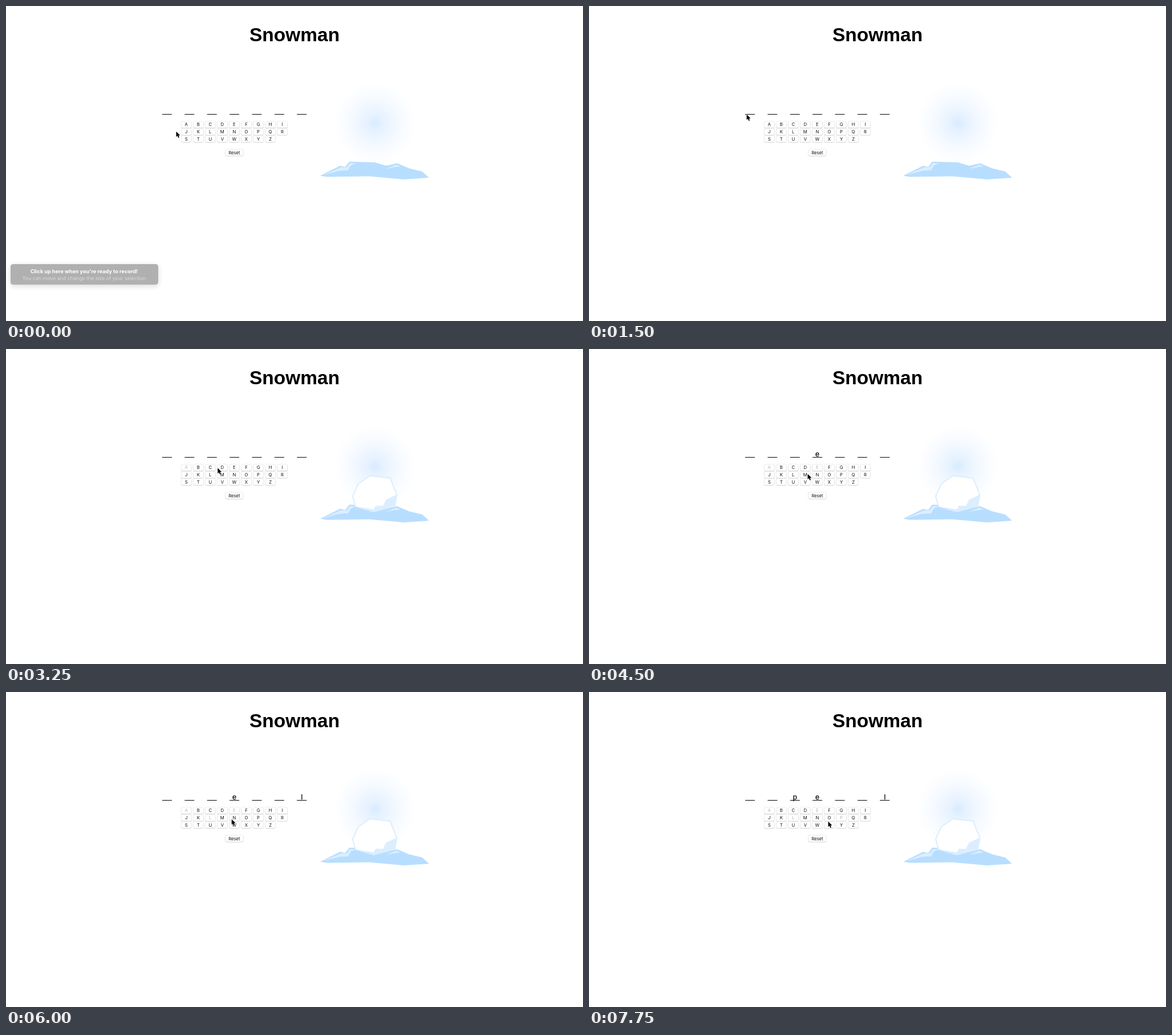
Recreate the animation shown at these times as an HTML page. Size 1012 px wide and 554 px high, loop 8 s.

```html
<!DOCTYPE html>
<html lang="en">
<head>
<meta charset="utf-8">
<title>Snowman</title>
<style>
  html, body { margin: 0; width: 100%; height: 100%; overflow: hidden; background: #fff; }
  svg { display: block; width: 100vw; height: 100vh; }
  text { text-anchor: middle; }
  .title { font: bold 33.5px "Liberation Sans", Arial, sans-serif; }
  .guess { font: 12.5px "Liberation Sans", Arial, sans-serif; stroke: #000; stroke-width: .25; }
  .key { font: 7.7px Inter, sans-serif; fill: #111; }
  .off { fill: #b4b4b4; }
  .tip { font: 8.8px Inter, sans-serif; fill: #d9d9d9; }
  .tip.main { font-weight: 700; font-size: 9.1px; fill: #fff; }
</style>
</head>
<body>
<svg viewBox="0 0 1012 554">
  <defs>
    <radialGradient id="glow">
      <stop offset="0" stop-color="#d8ebff"/>
      <stop offset=".2" stop-color="#e6f2ff"/>
      <stop offset=".6" stop-color="#f6faff"/>
      <stop offset="1" stop-color="#fff"/>
    </radialGradient>
    <filter id="soft" x="-10%" y="-50%" width="120%" height="200%">
      <feGaussianBlur stdDeviation="5"/>
    </filter>
  </defs>

  <text class="title" x="506" y="62">Snowman</text>

  <circle cx="647" cy="206" r="72" fill="url(#glow)"/>
  <path fill="#b8deff" d="M551 298.5L586 281L595 283L602 273.8L647 275L667 281L686 276.5L707 285.5L730 291L742 302L698 305L637 299.5L563 300.5Z"/>
  <path fill="#dbeeff" d="M556 297.5L588 283.6L598 283.5L603 276L614 276.5L605 280.5L600 289L585 289.8Z
    M666 286.3L685 279L692 282.3L683 283.2Z"/>
  <g id="ball" fill="#dbeeff">
    <path fill="#fff" stroke="#dbeeff" stroke-width="2" d="M608 259L618 236.8L638.3 223L673.6 227L685.4 256L682 276L645 286L613 277Z"/>
    <path d="M685.4 256L666.5 265L661 276L648.5 275.5L645 282L613 277L645 287L683 277Z"/>
  </g>

  <g id="slots"></g>
  <g id="keys"></g>

  <g id="tip">
    <rect x="8" y="456" width="259" height="37" rx="5" opacity=".14" filter="url(#soft)"/>
    <rect x="8" y="454" width="259" height="36" rx="4.5" fill="#b0b0b0"/>
    <text class="tip main" x="137" y="469.5">Click up here when you're ready to record!</text>
    <text class="tip" x="137" y="481.5">You can move and change the size of your selection</text>
  </g>

  <path id="cursor" stroke="#fff" stroke-linejoin="round" paint-order="stroke"
    d="M0 0V9.6L2.2 7.6L3.8 11.2L5.5 10.4L4 7L6.9 6.8Z"/>
</svg>

<script>
const LOOP = 8000, STEP = 250;
const $ = id => document.getElementById(id);

// Secret word: letters not guessed yet stay blank
const word = '  pe  l';
const guesses = 'AELP';
const guessTime = i => 2500 + 1500 * i;

// Places where the pointer rests or turns
const stops = [
  { t: 0, x: 298, y: 220 },
  { t: 250, x: 227, y: 228 },
  { t: 750, x: 205, y: 229 },
  { t: 1250, x: 205, y: 229 },
  { t: 1500, x: 276, y: 190 },
  { t: 2500, x: 317, y: 208 },
  { t: 3750, x: 400, y: 209 },
  { t: 4500, x: 383, y: 219 },
  { t: 5500, x: 359, y: 223 },
  { t: 6550, x: 437, y: 223 },
  { t: 7500, x: 437, y: 225 },
  { t: 7750, x: 419, y: 227 }
];

function add(parent, tag, attrs, text) {
  const el = document.createElementNS('http://www.w3.org/2000/svg', tag);
  for (const k in attrs) el.setAttribute(k, attrs[k]);
  if (text) el.textContent = text;
  return parent.appendChild(el);
}

function addKey(label, cx, cy, w) {
  const box = { x: cx - w / 2, y: cy - 5.9, width: w, height: 11.6, rx: 2.6 };
  add($('keys'), 'rect', { ...box, y: box.y + .7, fill: '#c4c4c4' });
  add($('keys'), 'rect', { ...box, fill: '#fff', stroke: '#dedede', 'stroke-width': .6 });
  return add($('keys'), 'text', { class: 'key', x: cx, y: cy + 2.8 }, label);
}

const marks = [...word].map((ch, i) => {
  const x = 282.4 + 39.4 * i;
  add($('slots'), 'rect', { x: x - 8.5, y: 190, width: 17, height: 1 });
  const el = add($('slots'), 'text', { class: 'guess', x, y: 189 }, ch);
  return { ch, el };
});

const keys = {};
for (let i = 0; i < 26; i++) {
  const ch = String.fromCharCode(65 + i);
  keys[ch] = addKey(ch, 316.2 + 21.05 * (i % 9), 208.6 + 12.6 * Math.floor(i / 9), 18.2);
}
addKey('Reset', 400.4, 257.8, 32);

const show = (el, on) => el.setAttribute('visibility', on ? 'visible' : 'hidden');
const ease = u => u * u * (3 - 2 * u);

function pointer(t) {
  const i = stops.findIndex(s => s.t >= t);
  if (i < 1) return stops[0];
  const a = stops[i - 1], b = stops[i];
  const u = ease((t - a.t) / (b.t - a.t));
  return { x: a.x + (b.x - a.x) * u, y: a.y + (b.y - a.y) * u };
}

function draw(time) {
  const t = Math.floor(time / STEP) * STEP;
  const { x, y } = pointer(t);
  $('cursor').setAttribute('transform', `translate(${x + .5} ${y + .7})`);
  show($('tip'), t < STEP);
  show($('ball'), t >= guessTime(0));
  [...guesses].forEach((ch, i) => {
    const done = t >= guessTime(i);
    keys[ch].classList.toggle('off', done);
    for (const m of marks) if (m.ch === ch.toLowerCase()) show(m.el, done);
  });
}

const start = performance.now();
function tick() {
  draw((performance.now() - start) % LOOP);
  requestAnimationFrame(tick);
}
tick();
</script>
</body>
</html>
```
